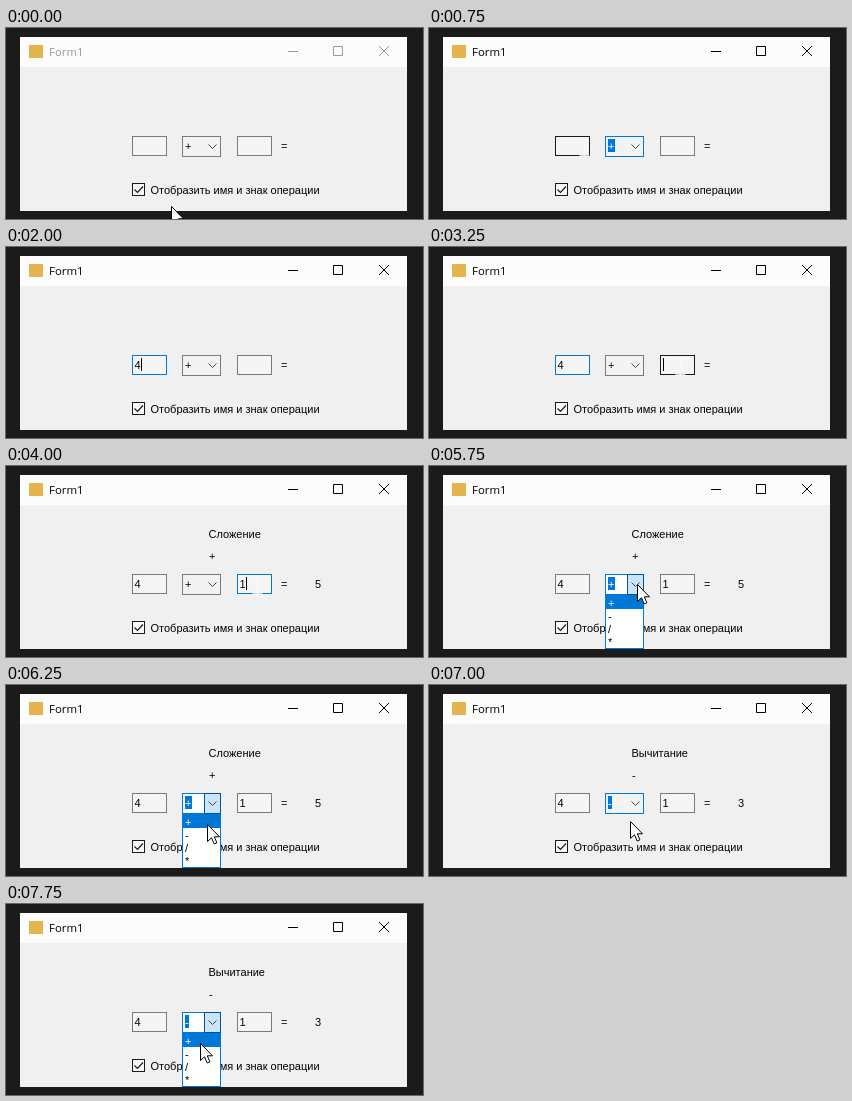
Recreate the animation shown at these times as an HTML page. Size 417 by 191 pixels, loop 8 s.

```html
<!DOCTYPE html>
<html lang="ru">
<head>
<meta charset="utf-8">
<style>
html, body { margin: 0; width: 100%; height: 100%; overflow: hidden; background: #1b1b1b; }
svg { display: block; font: 11px "Liberation Sans", Arial, sans-serif; }
.title { font: 11.4px "Open Sans", "Noto Sans", sans-serif; }
</style>
</head>
<body>
<svg id="stage" width="417" height="191" viewBox="0 0 417 191"></svg>
<script>
const STEP = 250, LOOP = 8000;
const BLUE = '#0078d7', GRAY = '#7a7a7a', DARK = '#1a1a1a';

// Pointer by time: [ms, kind, x, y]
const pointer = [
  [0, 'arrow', 165, 178], [250, 'arrow', 161, 158], [500, 'arrow', 157, 137],
  [750, 'beam', 155, 119], [1500, 'none'],
  [2250, 'arrow', 205, 141], [2500, 'beam', 251, 119], [3500, 'none'],
  [4000, 'beam', 251, 119], [4250, 'arrow', 240, 138], [4500, 'arrow', 228, 141],
  [4750, 'arrow', 217, 135], [5000, 'arrow', 211, 130],
  [5500, 'arrow', 208, 118], [6000, 'arrow', 205, 128], [6250, 'arrow', 201, 139],
  [6500, 'arrow', 197, 149], [7000, 'arrow', 201, 136], [7250, 'arrow', 205, 119],
  [7750, 'arrow', 194, 139]
];

const rect = (x, y, w, h, fill) => `<rect x="${x}" y="${y}" width="${w}" height="${h}" fill="${fill}"/>`;
const frame = (x, y, w, h, line, fill) =>
  `<rect x="${x + .5}" y="${y + .5}" width="${w - 1}" height="${h - 1}" fill="${fill}" stroke="${line}"/>`;
const text = (x, y, s, fill = '#000', cls = '') => `<text x="${x}" y="${y}" fill="${fill}" class="${cls}">${s}</text>`;
const path = (d, line, fill = 'none', width = 1) =>
  `<path d="${d}" stroke="${line}" fill="${fill}" stroke-width="${width}"/>`;

function windowBase(active) {
  const ink = active ? '#000' : '#999';
  return rect(0, 0, 417, 191, '#1b1b1b') + rect(14, 9, 387, 174, '#f0f0f0') +
    rect(14, 9, 387, 30, '#fcfcfc') + rect(23, 17, 14, 13, '#e3b54c') +
    text(43, 28, 'Form1', ink, 'title') +
    path('M282 23.5h10M327.5 18.5h9v9h-9z', ink) + path('M373 18l10 10M383 18l-10 10', ink) +
    frame(126, 155, 13, 13, DARK, '#f8f8f8') + path('M128.5 161.5l3 3 5.5-6', DARK, 'none', 1.2) +
    text(144.5, 166, 'Отобразить имя и знак операции') + text(275, 122, '=');
}

function textBox(x, value, line, caret) {
  return frame(x, 108, 35, 20, line, '#f5f5f5') + text(x + 2.5, 122, value) +
    (caret ? rect(x + (value ? 9 : 3), 111, 1, 13, '#000') : '');
}

function combo(sign, focused, open) {
  let s = frame(176, 108, 39, 21, focused ? BLUE : GRAY, open ? '#fff' : '#f3f3f3');
  if (open) s += frame(198, 108, 17, 21, '#005499', '#cce4f7');
  if (focused) s += rect(179, 111, sign === '-' ? 4 : 7, 13, BLUE);
  return s + text(179, 122, sign, focused ? '#fff' : '#000') + path('M202.5 116.5l4 4 4-4', '#444');
}

function list(hot) {
  return frame(176, 129, 39, 54, BLUE, '#fff') + rect(177, 130 + hot * 13, 37, 13, BLUE) +
    ['+', '-', '/', '*'].map((c, i) => text(179, 141 + i * 13, c, i === hot ? '#fff' : '#000')).join('');
}

function drawPointer([, kind, x, y]) {
  if (kind === 'none') return '';
  const d = kind === 'arrow' ? 'M0 0V17L4 13.3 6.7 19.5 9.4 18.3 6.8 12.3H12Z'
    : 'M-4 -7.5H4M0 -7.5V8.5M-5 8.5H5';
  return `<g transform="translate(${x + .5} ${y + .5})">` +
    (kind === 'arrow' ? path(d, '#000', '#fff') : path(d, '#fafafa', 'none', 1.3)) + '</g>';
}

function scene(t) {
  const within = (a, b) => t >= a && t < b;
  const first = within(1000, 3500), second = within(3000, 5750);
  const minus = t >= 6750, open = within(5750, 6750) || t >= 7500;
  const sign = minus ? '-' : '+';
  const hot = within(6500, 6750) || within(7500, 7750) ? 1 : 0;
  const line1 = first ? BLUE : within(750, 1000) ? DARK : GRAY;
  const line2 = t >= 3500 && second ? BLUE : within(2500, 3500) ? DARK : GRAY;
  let s = windowBase(t >= 500) +
    textBox(126, t >= 1500 ? '4' : '', line1, within(1000, 3000)) +
    combo(sign, within(500, 1000) || t >= 5750, open) +
    textBox(231, t >= 3500 ? '1' : '', line2, second);
  if (t >= 3500) {
    s += text(202.5, 72, minus ? 'Вычитание' : 'Сложение') +
      text(203, 94, sign) + text(309, 122, minus ? '3' : '5');
  }
  if (open) s += list(hot);
  return s + drawPointer(pointer.filter(p => p[0] <= t).pop());
}

const stage = document.getElementById('stage');
let shown = -1;
function tick() {
  const t = Math.floor(performance.now() % LOOP / STEP) * STEP;
  if (t !== shown) stage.innerHTML = scene(shown = t);
  requestAnimationFrame(tick);
}
tick();
</script>
</body>
</html>
```
